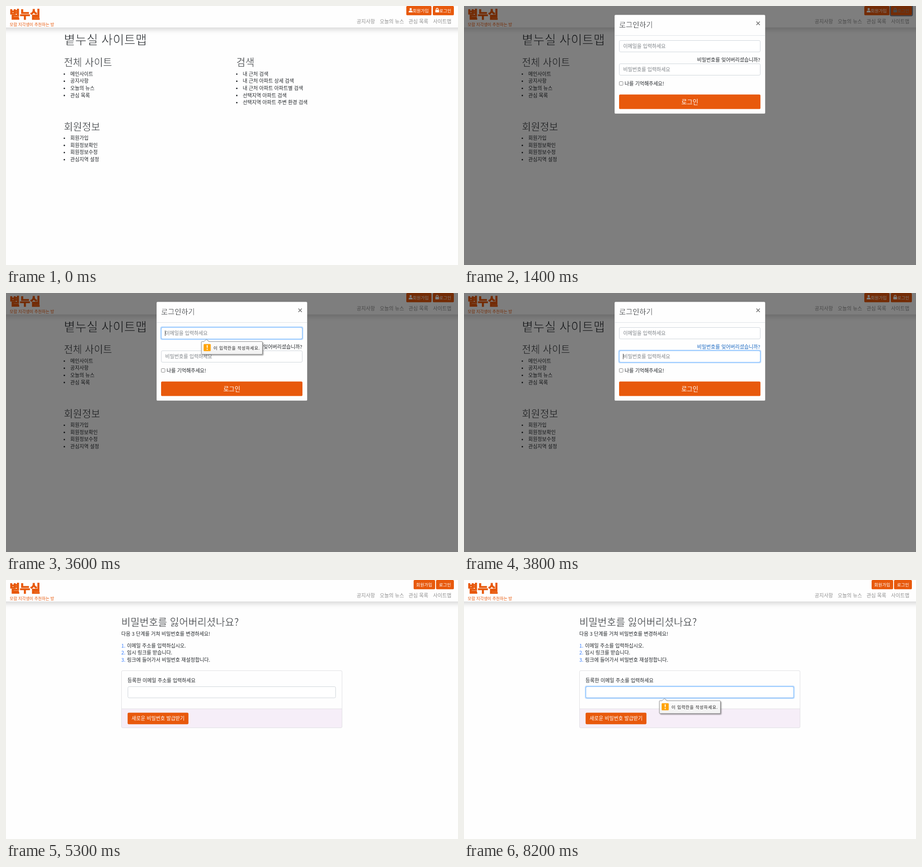
An HTML page for the animation above (8300 ms loop, 988 by 567 pixels).

```html
<!DOCTYPE html>
<html lang="ko">
<head>
<meta charset="utf-8">
<style>
  html, body { margin: 0; width: 100%; height: 100%; overflow: hidden; background: #fefefe; }
  svg { display: block; width: 988px; height: 567px; }
  text { font-family: "Noto Sans CJK KR", "Noto Sans CJK", sans-serif; font-weight: 300; white-space: pre; }
  .bar { filter: drop-shadow(0 5.2px 5.2px rgba(0, 0, 0, .15)); }
  .tip { filter: drop-shadow(2.5px 2.5px 1px rgba(0, 0, 0, .35)); }
  .logo { font-weight: 900; stroke: #e8590c; stroke-width: 1.3px; }
</style>
</head>
<body>
<svg id="stage" viewBox="0 0 988 567"></svg>
<script>
const INK = '#212529', ORANGE = '#e8590c', GREY = '#7d8287', NAV = '#8e8e8e', BODY = 10.85, LOOP = 8300, STEP = 100;
const SITE = '볕누실';

// Text is placed by its left edge and the vertical middle of its Hangul.
const text = (x, middle, str, size = BODY, fill = INK, attrs = '') =>
  `<text x="${x}" y="${(middle + size * .38).toFixed(2)}" font-size="${size}" fill="${fill}" ${attrs}>${str}</text>`;
// A thin outline in the page colour slims the strokes to a light weight.
const heading = (x, middle, str, size) =>
  text(x, middle, str, size, INK, `stroke="#fefefe" stroke-width="${(size * .027).toFixed(2)}"`);
const box = (x, y, w, h, fill, attrs = '') =>
  `<rect x="${x}" y="${y}" width="${w}" height="${h}" rx="2.6" fill="${fill}" ${attrs}/>`;
const group = (id, content, attrs = '') => `<g id="${id}" ${attrs}>${content}</g>`;

const field = (id, x, y, w, h, hint = '') =>
  box(x, y, w, h, '#fff', 'stroke="#ced4da"') +
  group(id + 'Glow',
    box(x - 1, y - 1, w + 2, h + 2, 'none', 'stroke="#007bff" stroke-opacity=".27" stroke-width="2.4"') +
    box(x, y, w, h, 'none', 'stroke="#80bdff"')) +
  text(x + 8.5, y + h / 2, hint, BODY, GREY) +
  `<rect id="${id}Caret" x="${x + 8}" y="${y + 6.5}" width="1" height="12" fill="#333"/>`;

const bullets = (x, y, items) => items.map((item, i) =>
  `<circle cx="${x + 1}" cy="${y + i * 15.65 + .5}" r="1.6" fill="${INK}"/>` +
  text(x + 14, y + i * 15.65, item)).join('');

const header = () =>
  '<rect class="bar" x="-20" y="-20" width="1028" height="67" fill="#fefefe"/>' +
  text(8, 18, SITE, 24.3, ORANGE, 'class="logo"') +
  text(8, 40.5, '모람 지각생이 추천하는 방', 8.9, ORANGE) +
  [[766.5, '공지사항'], [817, '오늘의 뉴스'], [880, '관심 목록']]
    .map(([x, s]) => text(x, 34, s, BODY, NAV)).join('') +
  text(933.5, 34, '사이트맵', BODY, NAV, 'class="mapLink"');

const smallButton = (x, w, textX, str, icon = '') =>
  box(x, 0, w, 20.3, ORANGE) + icon + text(textX, 10, str, 9.5, 'currentColor');

const userIcon = '<circle cx="884.5" cy="7" r="2.4" fill="#fff"/>' +
  '<path d="M880.3 14v-1.3q0-2.7 2.7-2.7h3q2.7 0 2.7 2.7V14z" fill="#fff"/>';
const lockIcon = '<rect x="938.5" y="8.6" width="8" height="5.4" rx=".8" fill="currentColor"/>' +
  '<path d="M940.3 9V7.2a2.2 2.2 0 0 1 4.4 0V9" fill="none" stroke="currentColor" stroke-width="1.4"/>';

const tooltip = (id, y) => group(id,
  '<path class="tip" d="M428.5 5.5H433l5-5 5 5H559q1.5 0 1.5 1.5V32q0 1.5-1.5 1.5H428.5q-1.5 0-1.5-1.5V7q0-1.5 1.5-1.5z" ' +
  'fill="url(#sheen)" stroke="#777" stroke-width=".9"/>' +
  '<rect x="432" y="11" width="15.5" height="15.5" rx="1.5" fill="#ffa40a"/>' +
  '<path d="M438.6 13.5h2.4l-.4 6.3h-1.6zM438.7 21.4h2.2v2.2h-2.2z" fill="#fff"/>' +
  text(453.5, 19.3, '이 입력란을 작성하세요.', 9.2, '#222', 'letter-spacing=".72"'),
  `transform="translate(0 ${y})"`);

const sitemapPage = () =>
  header() +
  group('loginFocus', box(932, -1, 48, 22.3, 'none', 'stroke="#414b60" stroke-opacity=".75" stroke-width="2.2"')) +
  group('joinButton', smallButton(875, 55, 889, '회원가입', userIcon), 'color="#fff"') +
  group('loginButton', smallButton(933, 46, 947, '로그인', lockIcon)) +
  heading(126.5, 74, SITE + ' 사이트맵', 27) +
  heading(126.5, 122.5, '전체 사이트', 21.6) +
  bullets(126.5, 148.5, ['메인사이트', '공지사항', '오늘의 뉴스', '관심 목록']) +
  heading(503.5, 122.5, '검색', 21.6) +
  bullets(503.5, 148.5, ['내 근처 검색', '내 근처 아파트 상세 검색', '내 근처 아파트 아파트별 검색',
    '선택지역 아파트 검색', '선택지역 아파트 주변 환경 검색']) +
  heading(126.5, 263.5, '회원정보', 21.6) +
  bullets(126.5, 289, ['회원가입', '회원정보확인', '회원정보수정', '관심지역 설정']);

const loginDialog = () =>
  '<rect width="988" height="567" opacity=".5"/>' +
  box(329, 19.3, 329.5, 216.5, '#fefefe', 'stroke="#000" stroke-opacity=".2" stroke-width=".7"') +
  heading(339, 41, '로그인하기', 16) +
  '<path d="M639.2 34.2l7.4 7.4m0-7.4l-7.4 7.4" stroke="#7b7b7b" stroke-width="1.7"/>' +
  '<path d="M329.5 64.5H658" stroke="#dee2e6"/>' +
  field('email', 339.5, 75.5, 308, 25, '이메일을 입력하세요') +
  text(647.5, 118, '비밀번호를 잊어버리셨습니까?', BODY, 'currentColor', 'id="forgot" text-anchor="end"') +
  field('password', 339.5, 126.5, 308, 25, '비밀번호를 입력하세요') +
  '<rect x="339.5" y="165.5" width="8" height="8" rx="1.2" fill="#fff" stroke="#767676" stroke-width=".9"/>' +
  text(351, 170, '나를 기억해주세요!') +
  box(339, 193.8, 309, 31.7, ORANGE) +
  text(475, 209.7, '로그인', 13.4, 'currentColor', 'id="submit"') +
  tooltip('emailTip', 100.8);

const resetPage = () =>
  header() +
  `<g color="#fff">${smallButton(891, 47, 896.5, '회원가입')}${smallButton(940, 39, 946.5, '로그인')}</g>` +
  heading(252, 91.5, '비밀번호를 잃어버리셨나요?', 21.8) +
  text(252, 117.5, '다음 3 단계를 거쳐 비밀번호를 변경하세요!') +
  ['이메일 주소를 입력하십시오.', '임시 링크를 받습니다.', '링크에 들어가서 비밀번호 재설정합니다.'].map((s, i) =>
    text(252, 143.5 + i * 15.65, i + 1 + '.', BODY, '#377dff') + text(264.5, 143.5 + i * 15.65, s)).join('') +
  box(252.5, 198.5, 482, 125, '#fefefe') +
  '<path d="M252.5 282H734.5V321q0 2.5-2.5 2.5H255q-2.5 0-2.5-2.5z" fill="#f6eef8"/>' +
  box(252.5, 198.5, 482, 125, 'none', 'stroke="#dfdfe2"') +
  '<path d="M252.5 282H734.5" stroke="#dfdfe2"/>' +
  text(265.5, 220, '등록한 이메일 주소를 입력하세요') +
  field('address', 266.5, 233.5, 454, 24.5) +
  box(265.8, 290.5, 133, 25.2, ORANGE) +
  text(274.5, 303.3, '새로운 비밀번호 발급받기', BODY, 'currentColor', 'id="issue"') +
  tooltip('addressTip', 258.8);

const $ = id => document.getElementById(id);
$('stage').innerHTML =
  '<defs><linearGradient id="sheen" x2="0" y2="1"><stop stop-color="#fff"/><stop offset="1" stop-color="#f1f1f1"/></linearGradient></defs>' +
  group('sitemap', sitemapPage()) + group('dialog', loginDialog()) + group('reset', resetPage());

const mapLinks = [...document.querySelectorAll('.mapLink')];
const ramp = (t, from, to) => Math.min(1, Math.max(0, (t - from) / (to - from)));
const during = (t, from, to) => t >= from && t < to;
const pulse = (t, a, b, c, d) => ramp(t, a, b) - ramp(t, c, d);
const show = (id, on) => $(id).style.display = on ? '' : 'none';
const fade = (id, amount) => $(id).style.opacity = amount;
const tint = (id, amount, from, to) =>
  $(id).style.color = `color-mix(in srgb, ${to} ${amount * 100}%, ${from})`;

function render(t) {
  show('sitemap', t < 5300);
  show('dialog', during(t, 1400, 5300));
  show('reset', t >= 5300);

  const mapHover = during(t, 800, 900) || during(t, 7800, 8000);
  mapLinks.forEach(link => link.style.fill = mapHover ? '#4d4d4d' : NAV);

  tint('loginButton', pulse(t, 800, 1000, 1300, 1500), '#fff', INK);
  show('loginFocus', during(t, 1400, 2500));

  tint('submit', pulse(t, 2300, 2500, 3000, 3200), '#fff', INK);
  fade('emailGlow', pulse(t, 2400, 2600, 3600, 3800));
  show('emailCaret', during(t, 2500, 3000) || during(t, 3500, 3700));
  fade('emailTip', t < 3700 ? ramp(t, 2600, 3000) : 0);
  fade('passwordGlow', pulse(t, 3600, 3800, 4100, 4300));
  show('passwordCaret', during(t, 3700, 4200));
  tint('forgot', ramp(t, 3600, 3800), INK, '#1565c0');

  fade('addressGlow', ramp(t, 6100, 6300));
  show('addressCaret', during(t, 6200, 7200) || during(t, 7700, 8200));
  tint('issue', pulse(t, 6600, 6800, 7500, 7700), '#fff', INK);
  fade('addressTip', ramp(t, 6900, 7300));
}

function tick() {
  render(Math.floor(performance.now() % LOOP / STEP) * STEP);
  requestAnimationFrame(tick);
}
tick();
</script>
</body>
</html>
```
